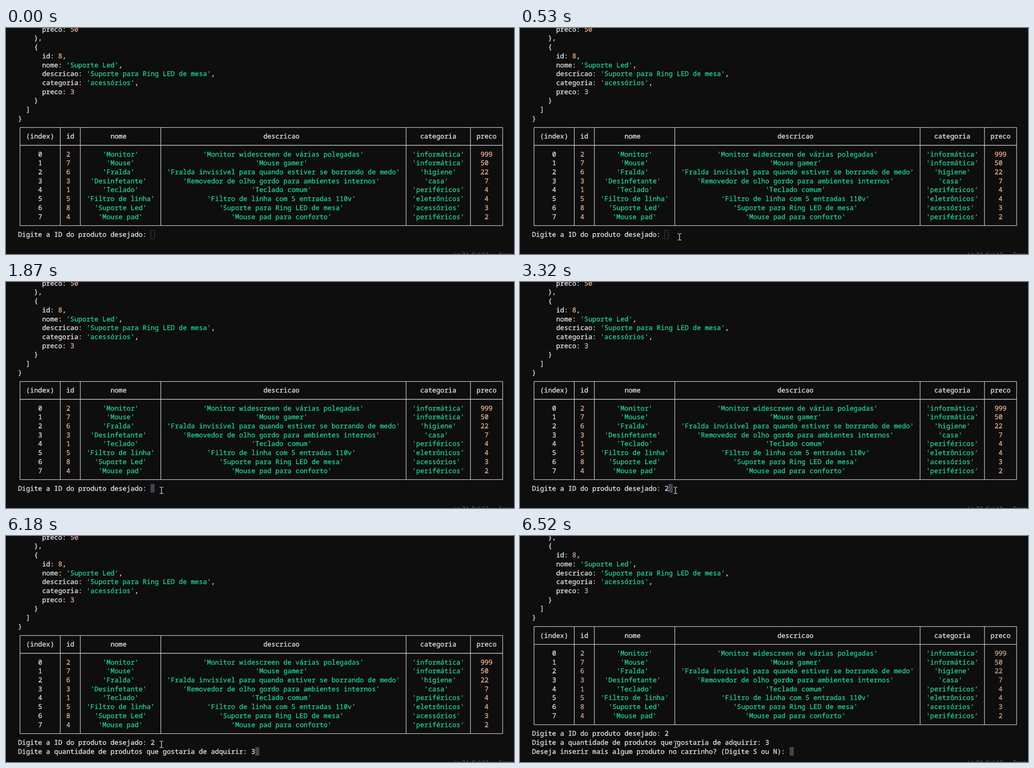
An HTML page with a canvas for the animation above (8 s loop, 1121 by 499 pixels).

```html
<!DOCTYPE html>
<html lang="pt">
<head>
<meta charset="utf-8">
<style>
  html, body { margin: 0; width: 100%; height: 100%; overflow: hidden; background: #0e0e0e; }
  canvas { display: block; }
</style>
</head>
<body>
<canvas id="stage" width="1121" height="499"></canvas>
<script>
const ctx = document.getElementById('stage').getContext('2d');
const LOOP = 8000;
const CELL = 8.875, ROW = 19.71, LEFT = 26.5, TOP = -7.3, ASCENT = 15;
const FONT = `${CELL / 0.6}px "Noto Sans Mono", monospace`;
const WHITE = '#dedede', GREEN = '#23cb8e', LINE = '#d0d0d0';

const listing = [
  ["      preco: ", '50'],
  ["    },"],
  ["    {"],
  ["      id: ", '8', ','],
  ["      nome: ", "'Suporte Led'", ','],
  ["      descricao: ", "'Suporte para Ring LED de mesa'", ','],
  ["      categoria: ", "'acessórios'", ','],
  ["      preco: ", '3'],
  ["    }"],
  ["  ]"],
  ["}"]
];

const borders = [0, 10, 15, 35, 96, 112, 120];
const header = ['(index)', 'id', 'nome', 'descricao', 'categoria', 'preco'];
const products = [
  [2, 'Monitor', 'Monitor widescreen de várias polegadas', 'informática', 999],
  [7, 'Mouse', 'Mouse gamer', 'informática', 50],
  [6, 'Fralda', 'Fralda invisível para quando estiver se borrando de medo', 'higiene', 22],
  [3, 'Desinfetante', 'Removedor de olho gordo para ambientes internos', 'casa', 7],
  [1, 'Teclado', 'Teclado comum', 'periféricos', 4],
  [5, 'Filtro de linha', 'Filtro de linha com 5 entradas 110v', 'eletrônicos', 4],
  [8, 'Suporte Led', 'Suporte para Ring LED de mesa', 'acessórios', 3],
  [4, 'Mouse pad', 'Mouse pad para conforto', 'periféricos', 2]
];

const askId = 'Digite a ID do produto desejado: ';
const askCount = 'Digite a quantidade de produtos que gostaria de adquirir: ';
const askMore = 'Deseja inserir mais algum produto no carrinho? (Digite S ou N): ';

// Pointer stops: time, x, y
const pointerPath = [
  [70, 848, 493], [136, 690, 486], [202, 545, 480], [267, 430, 474],
  [333, 350, 469], [399, 306, 465], [464, 332, 462], [530, 352, 461],
  [800, 357, 460], [930, 352, 460],
  [1460, 349, 460], [1550, 345, 460], [1630, 340, 460], [1720, 337, 460],
  [1870, 343, 460]
];

const colX = col => LEFT + col * CELL;
const rowY = row => TOP + row * ROW;

// A hairline outline gives the glyphs the terminal's heavier weight.
function put(text, col, row, color) {
  const x = colX(col), y = Math.round(rowY(row) + ASCENT);
  ctx.fillStyle = ctx.strokeStyle = color;
  ctx.lineWidth = 0.4;
  ctx.fillText(text, x, y);
  ctx.strokeText(text, x, y);
}

function putCell(text, i, row, color) {
  const room = borders[i + 1] - borders[i] - 1;
  put(text, borders[i] + 1 + Math.floor((room - text.length) / 2), row, color);
}

function drawListing(scroll, numColor) {
  listing.forEach((parts, row) => {
    let col = 0;
    parts.forEach((part, i) => {
      const value = part[0] === "'" ? GREEN : numColor;
      put(part, col, row - scroll, i === 1 ? value : WHITE);
      col += part.length;
    });
  });
}

function drawGrid(first) {
  const lineX = col => colX(col + 0.5);
  const lineY = row => rowY(row + 0.5) + 0.2;
  ctx.strokeStyle = LINE;
  ctx.lineWidth = 1.3;
  ctx.beginPath();
  for (const row of [first, first + 2, first + 11]) {
    ctx.moveTo(lineX(0), lineY(row));
    ctx.lineTo(lineX(120), lineY(row));
  }
  for (const col of borders) {
    ctx.moveTo(lineX(col), lineY(first));
    ctx.lineTo(lineX(col), lineY(first + 11));
  }
  ctx.stroke();
}

function drawTable(scroll, numColor) {
  const first = 11 - scroll;
  drawGrid(first);
  header.forEach((name, i) => putCell(name, i, first + 1, WHITE));
  products.forEach((product, n) => {
    const row = first + 3 + n;
    putCell(String(n), 0, row, WHITE);
    product.forEach((value, i) => {
      const isNum = typeof value === 'number';
      putCell(isNum ? String(value) : `'${value}'`, i + 1, row, isNum ? numColor : GREEN);
    });
  });
}

function drawBlock(col, row, color, hollow) {
  const x = Math.round(colX(col)), y = Math.round(rowY(row));
  if (hollow) {
    ctx.strokeStyle = color;
    ctx.lineWidth = 1;
    ctx.strokeRect(x + 0.5, y + 0.5, 8, 19);
  } else {
    ctx.fillStyle = color;
    ctx.fillRect(x, y, 9, 19);
  }
}

function drawPrompts(t, scroll) {
  const row = 23 - scroll;
  put(askId + (t >= 3320 ? '2' : ''), 0, row, WHITE);
  if (t >= 4380) put(askCount + (t >= 6180 ? '3' : ''), 0, row + 1, WHITE);
  if (t >= 6520) put(askMore, 0, row + 2, WHITE);

  const fill = '#434354';
  if (t < 800) drawBlock(askId.length, row, '#3a4842', true);
  else if (t < 3320) drawBlock(askId.length, row, fill);
  else if (t < 4380) drawBlock(askId.length + 1, row, fill);
  else if (t < 6180) drawBlock(askCount.length, row + 1, fill);
  else if (t < 6440) drawBlock(askCount.length + 1, row + 1, fill);
  else if (t < 6520) drawBlock(0, row + 2, '#484848');
  else drawBlock(askMore.length, row + 2, fill);
}

function drawPointer(t) {
  const stop = pointerPath.filter(p => p[0] <= t).pop();
  if (!stop) return;
  const [, x, y] = stop;
  ctx.fillStyle = '#e4e4e4';
  ctx.fillRect(x - 0.6, y - 6, 1.4, 13);
  for (const dy of [-7, 7]) {
    ctx.fillRect(x - 4, y + dy - 0.5, 3.5, 1.3);
    ctx.fillRect(x + 0.7, y + dy - 0.5, 3.5, 1.3);
  }
}

function drawStatus() {
  ctx.font = '13px "Open Sans", sans-serif';
  ctx.fillStyle = '#727272';
  ctx.fillText('Ln 74, Col 12', 988, 505);
  ctx.fillText('Espaços', 1088, 505);
}

function draw(t) {
  const scroll = t >= 6440 ? 1 : 0;
  const numColor = scroll ? '#cba38d' : '#e6ad8a';
  ctx.fillStyle = '#0e0e0e';
  ctx.fillRect(0, 0, 1121, 499);
  drawStatus();
  ctx.font = FONT;
  ctx.textRendering = 'geometricPrecision';
  ctx.lineJoin = 'round';
  drawListing(scroll, numColor);
  drawTable(scroll, numColor);
  drawPrompts(t, scroll);
  drawPointer(t);
}

const start = performance.now();
function tick() {
  draw((performance.now() - start) % LOOP);
  requestAnimationFrame(tick);
}
tick();
</script>
</body>
</html>
```
